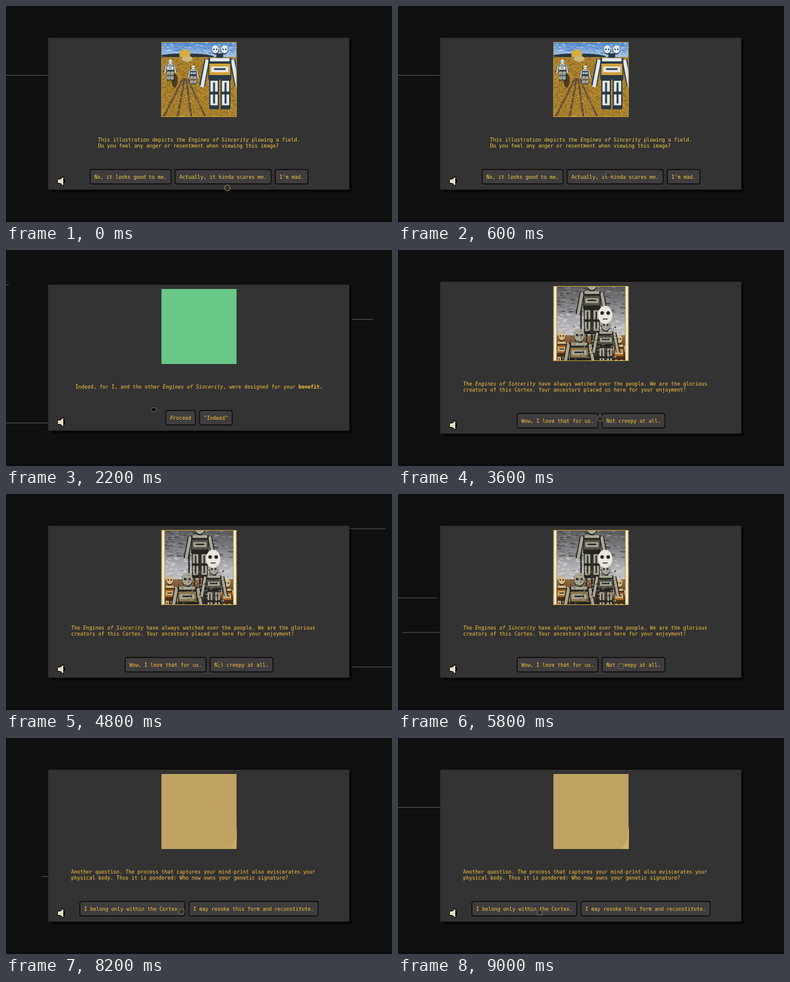
Write an HTML page with a canvas that moves like this. It is 640 px wide and 360 px high and loops after 9.2 s.

```html
<!DOCTYPE html>
<html>
<head>
<meta charset="utf-8">
<style>
html, body { margin: 0; width: 640px; height: 360px; overflow: hidden; background: #101010; }
canvas { display: block; }
</style>
</head>
<body>
<canvas id="stage" width="640" height="360"></canvas>
<script>
const ctx = document.getElementById('stage').getContext('2d');
const LOOP = 9200, STEP = 200, CHAR = 5, ART = 125;

// In the text, * switches italics and _ switches bold.
const screens = [
  { from: 0, top: 53, color: '#f7cc42', art: paintField,
    lines: ['This illustration depicts the *Engines of Sincerity* plowing a field.',
            'Do you feel any anger or resentment when viewing this image?'],
    buttons: ['No, it looks good to me.', 'Actually, it kinda scares me.', "I'm mad."] },
  { from: 1000, top: 58, color: '#fac43c', art: () => box('#69c788', 0, 0, ART, ART),
    lines: ['Indeed, for I, and the other *Engines of Sincerity*, were designed for your _benefit._'],
    buttons: ['Proceed', '"Indeed"'] },
  { from: 3000, top: 53, color: '#ffc23c', art: paintWatchers,
    lines: ['The *Engines of Sincerity* have always watched over the people. We are the glorious',
            'creators of this Cortex. Your ancestors placed us here for your enjoyment!'],
    buttons: ['Wow, I love that for us.', 'Not creepy at all.'] },
  { from: 6400, top: 53, color: '#ffc23c', art: paintSand,
    lines: ['Another question. The process that captures your mind-print also eviscerates your',
            'physical body. Thus it is pondered: Who now owns your genetic signature?'],
    buttons: ['I belong only within the Cortex.', 'I may revoke this form and reconstitute.'] }
];

// Light streaks behind the panel: grid row, start time, optional reach of the head
const streaks = [[2, -333], [5, 1800], [1, 2180], [4, 4829, 570], [3, 5533, 570], [4, 7017, 570], [2, 8650]];

// Pointer stops: time, x, y
const stops = [[0, 367, 303], [600, 349, 281], [1000, 349, 281], [2200, 245, 266],
  [3000, 335, 281], [3600, 335, 281], [5800, 369, 287], [7200, 369, 287], [9000, 235, 291]];

function box(color, x, y, w, h) {
  ctx.fillStyle = color;
  ctx.fillRect(x, y, w, h);
}
function oval(color, x, y, rx, ry = rx) {
  ctx.fillStyle = color;
  ctx.beginPath();
  ctx.ellipse(x, y, rx, ry, 0, 0, 2 * Math.PI);
  ctx.fill();
}
function line(color, width, x0, y0, x1, y1) {
  ctx.strokeStyle = color;
  ctx.lineWidth = width;
  ctx.beginPath();
  ctx.moveTo(x0, y0);
  ctx.lineTo(x1, y1);
  ctx.stroke();
}
function fade(y0, y1, ...colors) {
  const g = ctx.createLinearGradient(0, y0, 0, y1);
  colors.forEach((c, i) => g.addColorStop(i / (colors.length - 1), c));
  return g;
}
function speckle(seed, count, colors, x, y, w, h, size) {
  const random = () => (seed = seed * 16807 % 2147483647) / 2147483647;
  for (let i = 0; i < count; i++)
    box(colors[i % colors.length], x + random() * w, y + random() * h, size, 1);
}

// A robot built from proportions of its height; girth and head are in twelfths.
function robot({ x, top, h, girth = 4, heads = 1, head = 1.1, skin, shade, coat }) {
  const u = h / 12, half = girth * u / 2, chest = top + 2.8 * u, hip = chest + 3.6 * u;
  for (const side of [-1, 1]) {
    const shoulder = x + side * (half + u * .2), hand = shoulder + side * u * .9;
    line(shade, u, shoulder, chest + u * .3, hand, hip + u * 1.3);
    line(skin, u * .6, shoulder, chest + u * .3, hand, hip + u * 1.5);
    box(shade, x + side * half * .5 - half * .42, hip, half * .84, u * 5.4);
    for (const part of [.4, 2.8])
      box(skin, x + side * half * .5 - half * .32, hip + u * part, half * .64, u * 1.9);
    line(shade, half * .16, x + side * half * .5, hip + u * .7, x + side * half * .5, hip + u * 4.4);
  }
  box(shade, x - half * .3, top + u * 2, half * .6, u);
  box(shade, x - half, chest, half * 2, u * 3.8);
  box(skin, x - half * .85, chest, half * 1.7, u * .6);
  box(coat, x - half * .92, chest + u, half * 1.84, u * 2);
  box(skin, x - half * .75, chest + u * 1.5, half * 1.5, u);
  box(shade, x - half * .5, chest + u * 1.8, half, u * .3);
  for (let i = 0; i < heads; i++) {
    const cx = x + (i - (heads - 1) / 2) * u * 1.6, cy = top + u * 1.3;
    oval(shade, cx, cy + u * .15, head * u, head * u * 1.25);
    oval(skin, cx, cy, head * u * .94, head * u * 1.18);
    for (const side of [-.4, .4]) oval(shade, cx + side * head * u, cy, head * u * .22);
  }
}

function frame() {
  ctx.strokeStyle = '#c9a23a';
  ctx.lineWidth = 1;
  ctx.strokeRect(.5, .5, ART - 1, ART - 1);
}

function paintField() {
  const horizon = 25, metal = { skin: '#e2e8ea', shade: '#2a3945', coat: '#d0a238' };
  box(fade(0, horizon, '#4f86cc', '#a9c8e6'), 0, 0, ART, ART);
  speckle(41, 60, ['#c9dcec', '#4478ba'], 0, 0, ART, horizon - 6, 5);
  oval('#273640', 40, horizon, 48, 6);
  oval('#d8ab3e', 39, 21, 9);
  box('#a77f2c', 0, horizon, ART, ART);
  for (let x = 4; x < 80; x += 23) line('#5d483f', 3, 36 + x * .1, 60, x, ART);
  speckle(77, 1800, ['#d8aa40', '#5d431c', '#c59a38', '#8c6928'], 0, horizon, ART, ART, 1.6);
  oval('#cbb77c', 43, 28, 9, 5);
  oval('#4b3a22', 22, 64, 5, 12);
  robot({ ...metal, x: 15, top: 29, h: 36, coat: '#d9d6c7' });
  robot({ ...metal, x: 53, top: 39, h: 32, coat: '#495968' });
  robot({ ...metal, x: 97, top: 0, h: 114, heads: 2, head: .6 });
  frame();
}

function paintWatchers() {
  const iron = { skin: '#aaa696', shade: '#25241f', coat: '#55524a' };
  const watcher = { skin: '#d2bb88', shade: '#4a2f18', coat: '#a8692a', h: 76, girth: 2.6, head: .95 };
  box(fade(0, 95, '#58585a', '#828286', '#b4b4b8', '#cfcfd0'), 0, 0, ART, ART);
  speckle(29, 260, ['#3c3c3e', '#68686b', '#97989b'], 0, 0, ART, 45, 6);
  speckle(53, 200, ['#dededd', '#a2a3a7'], 0, 45, ART, 38, 5);
  box(fade(78, ART, '#a0764c', '#2a221b'), 0, 82, ART, 45);
  for (let x = 46; x < 76; x += 9) line(iron.shade, 2.5, x, 26, x, ART);
  robot({ ...iron, x: 64, top: -14, h: 96, girth: 3.6 });
  robot({ ...watcher, x: 14, top: 75 });
  robot({ ...watcher, x: 109, top: 80 });
  robot({ ...iron, x: 43, top: 71, h: 100, girth: 3.8, coat: '#8a7549' });
  robot({ ...iron, x: 87, top: 56, h: 84, girth: 3.6 });
  oval('#e8e6dd', 86, 48, 12, 15);
  for (const x of [81, 91]) oval(iron.shade, x, 45, 3);
  line(iron.shade, 1.5, 82, 55, 90, 55);
  speckle(91, 220, [iron.shade, '#6e6b60', '#bcb7a6'], 28, 66, 75, 60, 2);
  for (const x of [1, 120]) {
    box('#b88c2e', x - 1, 0, 6, ART);
    box('#f2eddd', x, 0, 4, ART);
  }
  frame();
}

function paintSand(t) {
  box('#c0a262', 0, 0, ART, ART);
  ctx.globalAlpha = Math.max(0, Math.min(1, (t - 7800) / 1200));
  for (let i = 0; i < 14; i++) {
    line('#b99a5a', .5, 20 + i * 7, 8 + i * 3, 48 + i * 6, 38 + i * 5);
    line('#d2b068', 1.5, ART - i, ART, ART, 88 + i * 2);
  }
  ctx.globalAlpha = 1;
}

function write(text, x, y, color) {
  let italic = false, bold = false;
  ctx.fillStyle = color;
  for (const part of text.split(/([*_])/)) {
    if (part === '*') italic = !italic;
    else if (part === '_') bold = !bold;
    else {
      ctx.font = `${italic ? 'italic' : ''} ${bold ? 'bold' : ''} 8.3px "DejaVu Sans Mono", monospace`;
      ctx.fillText(part, x, y);
      x += part.length * CHAR;
    }
  }
}

function drawText({ lines, color }, y) {
  const longest = lines[0].replace(/[*_]/g, '').length * CHAR;
  const x = Math.max(108, 320 - longest / 2);
  const wrapped = lines.length > 1 && longest > 400;
  lines.forEach((text, i) => write(text, wrapped ? 108 : x, y + i * 10, color));
}

function drawButtons(labels, y, color) {
  const width = label => label.length * CHAR + 15, gap = 6;
  const total = labels.reduce((sum, label) => sum + width(label) + gap, -gap);
  let x = 320 - total / 2;
  for (const label of labels) {
    ctx.beginPath();
    ctx.roundRect(x + .5, y + .5, width(label) - 1, 24, 3);
    ctx.fillStyle = '#3f3d3e';
    ctx.fill();
    ctx.strokeStyle = '#080808';
    ctx.lineWidth = 1.3;
    ctx.stroke();
    write(label, x + 7.5, y + 16, color);
    x += width(label) + gap;
  }
}

function drawSpeaker(y) {
  const shape = new Path2D(`M86 ${y - 3}h4l5-4v14l-5-4h-4z`);
  ctx.strokeStyle = '#080808';
  ctx.lineWidth = 2;
  ctx.stroke(shape);
  ctx.fillStyle = '#e6dfc6';
  ctx.fill(shape);
  line('#080808', 2, 97, y - 3, 97, y + 3);
}

function drawStreaks(t) {
  const length = 225, speed = .24;
  for (const [row, start, reach = 640 + length] of streaks) {
    const head = (t - start) * speed, tail = Math.max(0, head - length);
    if (head > 0 && head < reach) box('rgba(180,180,175,.45)', tail, 57.6 * row - .2, head - tail, 1);
  }
}

function drawPointer(t) {
  const next = stops.findIndex(stop => stop[0] > t);
  const [t1, x1, y1] = stops.at(next), [t0, x0, y0] = next < 0 ? stops.at(-1) : stops[next - 1];
  const k = t1 > t0 ? (t - t0) / (t1 - t0) : 0, e = k * k * (3 - 2 * k);
  const squashed = Math.abs(t - 2200) <= STEP;
  ctx.beginPath();
  ctx.ellipse(x0 + (x1 - x0) * e, y0 + (y1 - y0) * e, 4.6, squashed ? 3.3 : 4.6, 0, 0, 2 * Math.PI);
  ctx.fillStyle = squashed ? '#0c0c0a' : 'rgba(40,40,36,.45)';
  ctx.fill();
  ctx.strokeStyle = t < STEP ? '#8f853f' : '#6c6959';
  ctx.lineWidth = 1.3;
  ctx.stroke();
}

function draw(t) {
  const screen = screens.findLast(s => s.from <= t), { top } = screen;
  const height = 359 - 2 * top, bottom = top + height;
  box('#101010', 0, 0, 640, 360);
  box('#0b0b0b', 0, 356, 640, 4);
  drawStreaks(t);
  box('#080808', 75, top + 5, 499, height);
  box('#333333', 70, top, 499, height);
  ctx.save();
  ctx.translate(257.5, top + 7);
  ctx.beginPath();
  ctx.rect(0, 0, ART, ART);
  ctx.clip();
  screen.art(t);
  ctx.restore();
  drawText(screen, top + 173);
  drawButtons(screen.buttons, bottom - 34, screen.color);
  drawSpeaker(bottom - 14);
  drawPointer(t);
}

const begin = performance.now();
function tick() {
  const t = (performance.now() - begin) % LOOP;
  draw(Math.floor(t / STEP) * STEP);
  requestAnimationFrame(tick);
}
tick();
</script>
</body>
</html>
```
